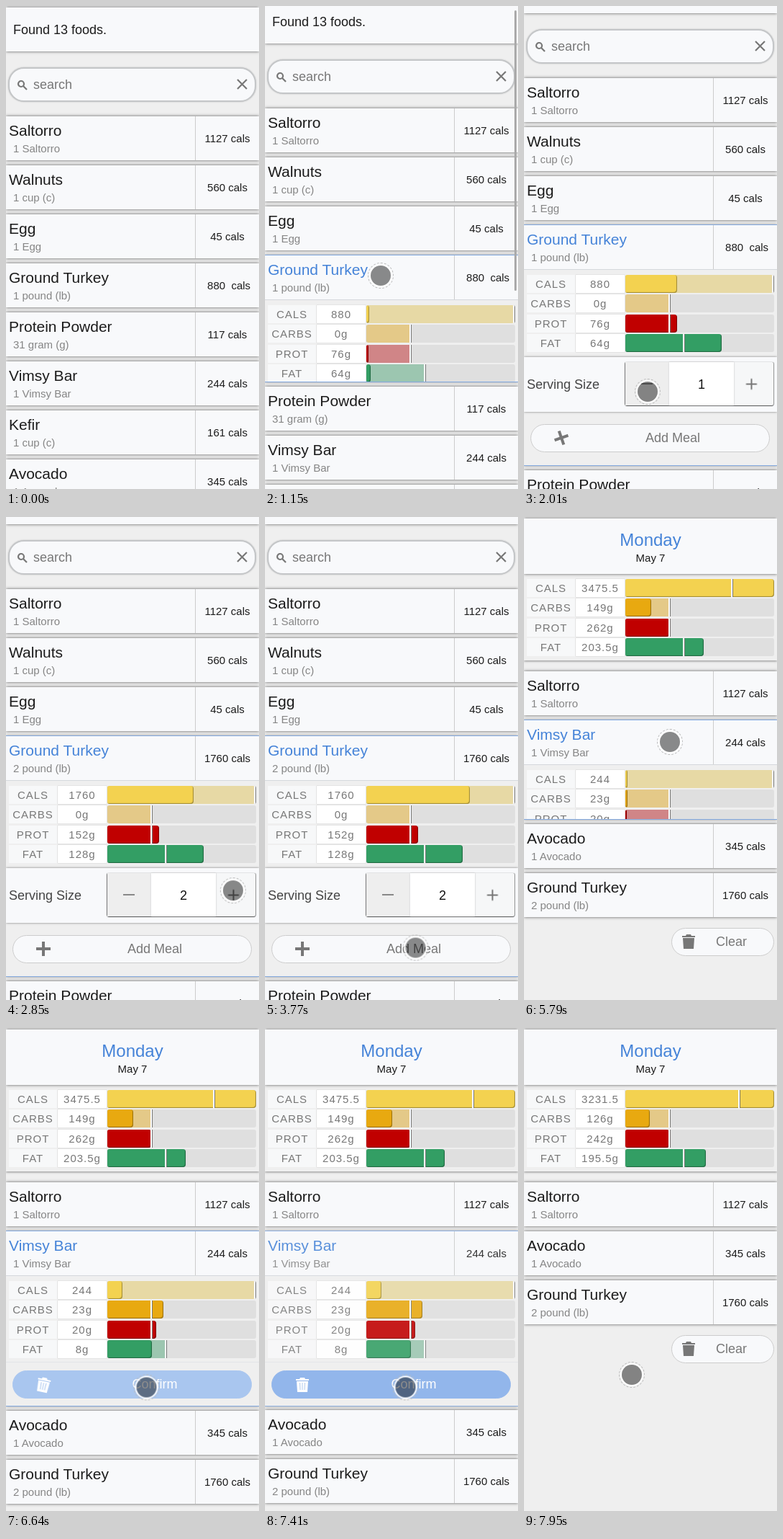
An HTML page for the animation above (8000 ms loop, 352 px wide and 670 px high).

```html
<!DOCTYPE html>
<html lang="en">
<head>
<meta charset="utf-8">
<title>Food diary</title>
<style>
  html, body { margin: 0; width: 100%; height: 100%; overflow: hidden; background: #efefef; }
  body { font: 15px "Liberation Sans", Arial, sans-serif; color: #1c1c1c; }
  #stage { position: relative; width: 352px; height: 670px; overflow: hidden; }
  .page { position: absolute; inset: 0; background: #efefef; }
  #scroller, .abs { position: absolute; }
  #scroller { inset: 0; }
  .panel { left: 0; width: 352px; box-sizing: border-box; background: #f8f9fb; box-shadow: 0 0 4px #555; }
  .list { position: absolute; left: 0; width: 352px; }

  .item { position: relative; margin-bottom: 7px; background: #efefef; box-shadow: 0 0 4px #555; }
  .head { position: relative; height: 61px; background: #f8f9fb; }
  .head > * { position: absolute; white-space: nowrap; }
  .name { left: 4px; top: 6px; font-size: 21px; line-height: 28px; }
  .sub { left: 10px; top: 35px; line-height: 20px; color: #858585; }
  .kcal { left: 263px; right: 0; top: 0; line-height: 61px; text-align: center; border-left: 1px solid #ccc; }
  .detail { position: relative; height: 0; overflow: hidden; box-shadow: inset 0 1px #d5d8dc; }
  .glow { position: absolute; inset: -1px 0; border: solid #84aae0; border-width: 1px 0; opacity: 0; pointer-events: none; }

  .bars { position: absolute; left: 4px; top: 8px; }
  .bar { position: relative; height: 25px; margin-bottom: 2.3px; line-height: 25px; letter-spacing: 1px; text-align: center; color: #777; }
  .bar > * { position: absolute; top: 0; height: 25px; }
  .label { width: 67px; background: #f7f8f9; }
  .value { left: 68px; width: 68px; background: #fff; box-shadow: 0 0 1px #aaa; }
  .track { left: 137px; width: 207px; background: #dfdfdf; border-radius: 3px; overflow: hidden; }
  .track > * { position: absolute; left: 0; top: 0; height: 25px; }
  .fill { border-radius: 0 4px 4px 0; box-shadow: inset -1px -1px 1px rgba(0,0,0,.35); }
  .mark { width: 2px; margin-left: -1px; background: #fff; box-shadow: 1px 0 #777; }

  .swap { display: inline-grid; }
  .swap > * { grid-area: 1 / 1; }
  .pill { box-sizing: border-box; height: 39px; border: 1px solid #ccc; border-radius: 20px; background: #f8f9fb;
          color: #777; font-size: 18px; line-height: 37px; text-align: center; }
  .pill svg { position: absolute; }
  svg { fill: currentColor; overflow: visible; }
  .line { fill: none; stroke: currentColor; }
  .ribs { display: none; }
  #confirm .ribs { display: block; stroke: #a9c6ef; }
  #pointer { position: absolute; left: -14px; top: -14px; width: 28px; height: 28px; border-radius: 50%;
             background: rgba(0,0,0,.45); box-shadow: 0 0 0 2px #fff; }
  #pointer::after { content: ""; position: absolute; inset: -4px; border: 1px dashed #bbb; border-radius: 50%; }
</style>
</head>
<body>
<div id="stage"></div>
<script>
const LOOP = 8000;
const HOLD = 'steps(1, end)';
const BLUE = '#4583d8', INK = '#1c1c1c';
const COLORS = {
  CALS: ['#e7d9a5', '#f3d250'],
  CARBS: ['#e4c988', '#e8a910'],
  PROT: ['#d08587', '#c00000'],
  FAT: ['#9cc6b0', '#339e64'],
};
const $ = selector => document.querySelector(selector);

// Shows one text before the given time and another after it.
const swap = (time, before, after) =>
  `<span class="swap"><span data-until="${time}">${before}</span><span data-from="${time}">${after}</span></span>`;

const bars = rows => `<div class="bars">${rows.map(([label, value, goal, fill]) => `
  <div class="bar"><div class="label">${label}</div><div class="value">${value}</div>
    <div class="track">
      <div style="width:${goal}px;background:${COLORS[label][0]}"></div>
      <div class="fill ${label}" style="width:${fill}px;background:${COLORS[label][1]}"></div>
      <div class="mark ${label}" style="left:${goal}px"></div>
    </div></div>`).join('')}</div>`;

const item = (name, sub, kcal, id = '', detail = '') => `
  <div class="item" id="${id}">
    <div class="head"><div class="name">${name}</div><div class="sub">${sub}</div><div class="kcal">${kcal} cals</div></div>
    ${detail && `<div class="detail">${detail}</div><div class="glow"></div>`}
  </div>`;

const plus = (x, y, size, weight, id = '') => `<svg id="${id}" class="line abs" style="left:${x - size / 2}px;top:${y - size / 2}px"
  width="${size}" height="${size}" viewBox="-1 -1 2 2"><path vector-effect="non-scaling-stroke" stroke-width="${weight}" d="M-1 0H1M0-1V1"/></svg>`;

const trash = (x, y) => `<svg style="left:${x}px;top:${y}px" width="18" height="20">
  <path d="M0 2h5l1-2h6l1 2h5v2H0zM1 5h16l-1 15H2z"/><path class="ribs" d="M5.500 7l.5 10M9 7v10M12.500 7l-.5 10"/></svg>`;

const turkey = bars([
  ['CALS', swap(2620, '880', '1760'), 205, 72],
  ['CARBS', '0g', 61, 0],
  ['PROT', swap(2620, '76g', '152g'), 61, 72],
  ['FAT', swap(2620, '64g', '128g'), 81, 134],
]) + `
  <div class="abs panel" style="top:122px;height:76px;box-shadow:0 0 3px #777">
    <div class="abs" style="left:4px;top:0;font-size:18px;line-height:76px;color:#444">Serving Size</div>
    <div class="abs" style="left:141px;top:7px;width:206px;height:60px;box-shadow:0 1px 1px #555,-1px 0 1px #777,1px 0 1px #999;background:#f6f7f8;border-radius:2px;color:#777">
      <div class="abs" style="left:0;width:60px;height:60px;background:#eee"></div>
      <div class="abs" style="left:22px;top:29px;width:16px;height:2px;background:#888"></div>
      <div class="abs" style="left:61px;width:90px;height:60px;background:#fff;color:#111;font-size:18px;line-height:62px;text-align:center;box-shadow:0 0 2px #bbb">${swap(2620, 1, 2)}</div>
      ${plus(175, 30, 15, 2)}
    </div>
  </div>
  <div class="pill abs" style="left:9px;top:215px;width:333px"><span class="abs" style="left:0;width:394px">Add Meal</span>${plus(42, 18, 20, 4, 'addIcon')}</div>`;

const snack = bars([
  ['CALS', '244', 205, 21], ['CARBS', '23g', 61, 78], ['PROT', '20g', 61, 68], ['FAT', '8g', 81, 62],
]) + `
  <div class="abs" style="top:120px;width:352px;height:1px;background:#e2e4e8"></div>
  <div class="pill abs" id="confirm" style="left:9px;top:132px;width:333px">
    <span class="abs" style="left:0;width:394px">${swap(6640, 'Delete', 'Confirm')}</span>${trash(33, 9)}</div>`;

$('#stage').innerHTML = `
  <div class="page" id="foods">
    <div id="scroller">
      <div class="panel abs" style="top:2px;height:61px;padding-left:10px;font-size:18px;line-height:62px">Found 13 foods.</div>
      <div class="abs" style="left:3px;top:85px;width:341px;height:44px;border:2px solid #c4c6c8;border-radius:22px;background:#f8f9fb;box-shadow:0 0 2px #bbb;color:#777">
        <svg class="line abs" style="left:11px;top:16px;stroke-width:2.200" width="14" height="14"><circle cx="5" cy="5" r="4"/><path d="M8 8l5 5"/></svg>
        <span class="abs" style="left:33px;font-size:18px;line-height:45px">search</span>
        <svg class="line abs" style="left:317px;top:15px;stroke-width:2.200" width="14" height="14"><path d="M0 0l13 13M13 0L0 13"/></svg>
      </div>
      <div class="list" style="top:153px">
        ${item('Saltorro', '1 Saltorro', 1127)}
        ${item('Walnuts', '1 cup (c)', 560)}
        ${item('Egg', '1 Egg', 45)}
        ${item('Ground Turkey', swap(2620, '1 pound (lb)', '2 pound (lb)'), swap(2620, 880, 1760), 'turkey', turkey)}
        ${item('Protein Powder', '31 gram (g)', 117)}
        ${item('Vimsy Bar', '1 Vimsy Bar', 244)}
        ${item('Kefir', '1 cup (c)', 161)}
        ${item('Avocado', '1 Avocado', 345)}
      </div>
    </div>
    <div id="scrollbar" class="abs" style="left:347px;top:6px;width:3px;height:389px;border-radius:2px;background:#aaa"></div>
  </div>
  <div class="page" id="day">
    <div class="panel abs" style="top:2px;height:77px;text-align:center">
      <div style="padding-top:15px;font-size:24px;line-height:30px;color:${BLUE}">Monday</div><div style="line-height:20px">May 7</div>
    </div>
    <div class="abs" id="totals" style="top:78px;width:352px;height:121px;box-shadow:0 1px 3px #888;clip-path:inset(2px 0 -6px)">
      ${bars([
        ['CALS', swap(7490, '3475.5', '3231.5'), 148, 207],
        ['CARBS', swap(7490, '149g', '126g'), 61, 36],
        ['PROT', swap(7490, '262g', '242g'), 61, 61],
        ['FAT', swap(7490, '203.5g', '195.5g'), 81, 109],
      ])}
    </div>
    <div class="list" style="top:214px">
      ${item('Saltorro', '1 Saltorro', 1127)}
      ${item('Vimsy Bar', '1 Vimsy Bar', 244, 'snack', snack)}
      ${item('Avocado', '1 Avocado', 345)}
      ${item('Ground Turkey', '2 pound (lb)', 1760)}
      <div class="pill" style="position:relative;margin:15px 0 0 205px;width:143px">${trash(14, 8)}<span class="abs" style="left:0;width:165px">Clear</span></div>
    </div>
  </div>
  <div id="pointer"></div>`;

// Each step is [time, value, easing towards the next step].
function play(target, property, steps) {
  const element = typeof target === 'string' ? $(target) : target;
  const all = [[0, steps[0][1], HOLD], ...steps, [LOOP, steps.at(-1)[1]]];
  element.animate(
    all.map(([time, value, easing = 'linear']) => ({ offset: time / LOOP, [property]: value, easing })),
    { duration: LOOP, iterations: Infinity });
}
const px = steps => steps.map(([time, value, easing]) => [time, value + 'px', easing]);
const flip = (target, property, time, before, after) => play(target, property, [[0, before, HOLD], [time, after]]);

document.querySelectorAll('[data-from]').forEach(el => flip(el, 'opacity', +el.dataset.from, 0, 1));
document.querySelectorAll('[data-until]').forEach(el => flip(el, 'opacity', +el.dataset.until, 1, 0));

flip('#foods', 'opacity', 3850, 1, 0);
flip('#day', 'opacity', 3850, 0, 1);

function openItem(id, time, heights, fills, settle) {
  flip(`#${id} .name`, 'color', time, INK, BLUE);
  flip(`#${id} .glow`, 'opacity', time, 0, 1);
  play(`#${id} .detail`, 'height', px(heights));
  for (const [label, [from, to]] of Object.entries(fills))
    play(`#${id} .fill.${label}`, 'width', px([[settle, from, 'ease-out'], [settle + 520, to]]));
}

openItem('turkey', 1070,
  [[1070, 0, HOLD], [1071, 40, HOLD], [1150, 114], [1230, 114, 'ease-out'], [1500, 272]],
  { PROT: [3, 72], FAT: [6, 134] }, 1230);
play('#turkey .fill.CALS', 'width', px([[1230, 4, 'ease-out'], [1750, 72], [2620, 72, 'ease-out'], [3100, 144]]));
play('#scroller', 'transform', [[1070, 0], [1150, -11], [1230, -11, 'ease-out'], [1500, -53]]
  .map(([time, y, easing]) => [time, `translateY(${y}px)`, easing]));
play('#scrollbar', 'opacity', [[0, 0, HOLD], [1070, 1], [1550, 1], [1840, 0]]);
play('#addIcon', 'transform', [[1700, 'rotate(0)'], [1840, 'rotate(90deg)'], [1960, 'rotate(90deg)'], [2200, 'rotate(0)'],
  [3000, 'rotate(0)'], [3310, 'rotate(90deg)']]);

openItem('snack', 5790,
  [[5790, 0, HOLD], [5791, 76], [5870, 76, 'ease-out'], [6100, 181]],
  { CALS: [3, 21], CARBS: [3, 78], PROT: [2, 68], FAT: [3, 62] }, 5870);
play('#confirm', 'backgroundColor', [[6560, '#f8f9fb', HOLD], [6640, '#a9c6ef'], [6720, '#a9c6ef'], [7100, '#86aeea']]);
play('#confirm', 'borderColor', [[6560, '#ccc', HOLD], [6640, '#a9c6ef'], [6720, '#a9c6ef'], [7100, '#86aeea']]);
flip('#confirm', 'color', 6640, '#777', '#fff');
play('#confirm svg', 'transform', [[6560, 'rotate(0)', HOLD], [6640, 'rotate(12deg)'], [6720, 'rotate(12deg)'], [7100, 'rotate(0)']]);

play('#snack', 'marginBottom', px([[7410, 7, 'ease-out'], [7720, -242]]));
play('#snack', 'opacity', [[7400, 1], [7500, 0]]);
play('#totals .mark.CALS', 'left', px([[7490, 148, 'ease-out'], [7900, 158]]));
play('#totals .fill.CARBS', 'width', px([[7490, 36, 'ease-out'], [7900, 34]]));
play('#totals .fill.FAT', 'width', px([[7490, 109, 'ease-out'], [7900, 112]]));

const path = [
  [260, -16, 686, 'ease-out'], [840, 161, 374], [1500, 161, 374, 'ease-in-out'], [1840, 165, 588], [1950, 165, 588],
  [2010, 172, 535], [2080, 172, 535, 'ease-out'], [2390, 320, 515], [2780, 320, 515, 'ease-in-out'], [3310, 205, 602, HOLD],
  [3390, 204, 601, HOLD], [3770, 209.5, 597.5, HOLD], [4200, 345, 229, 'ease-in-out'], [4650, 182, 290, 'ease-out'],
  [5010, 217, 329], [5220, 217, 329, 'ease-out'], [5640, 203, 312], [6100, 203, 312, 'ease-in-out'], [6560, 195.5, 498.5],
  [7500, 195.5, 498.5, 'ease-out'], [7950, 150, 481],
];
play('#pointer', 'transform', path.map(([time, x, y, easing]) => [time, `translate(${x}px, ${y}px)`, easing]));
play('#pointer', 'opacity', [[0, 0, HOLD], [260, 1, HOLD], [3850, 0, HOLD], [4230, 1]]);
</script>
</body>
</html>
```
